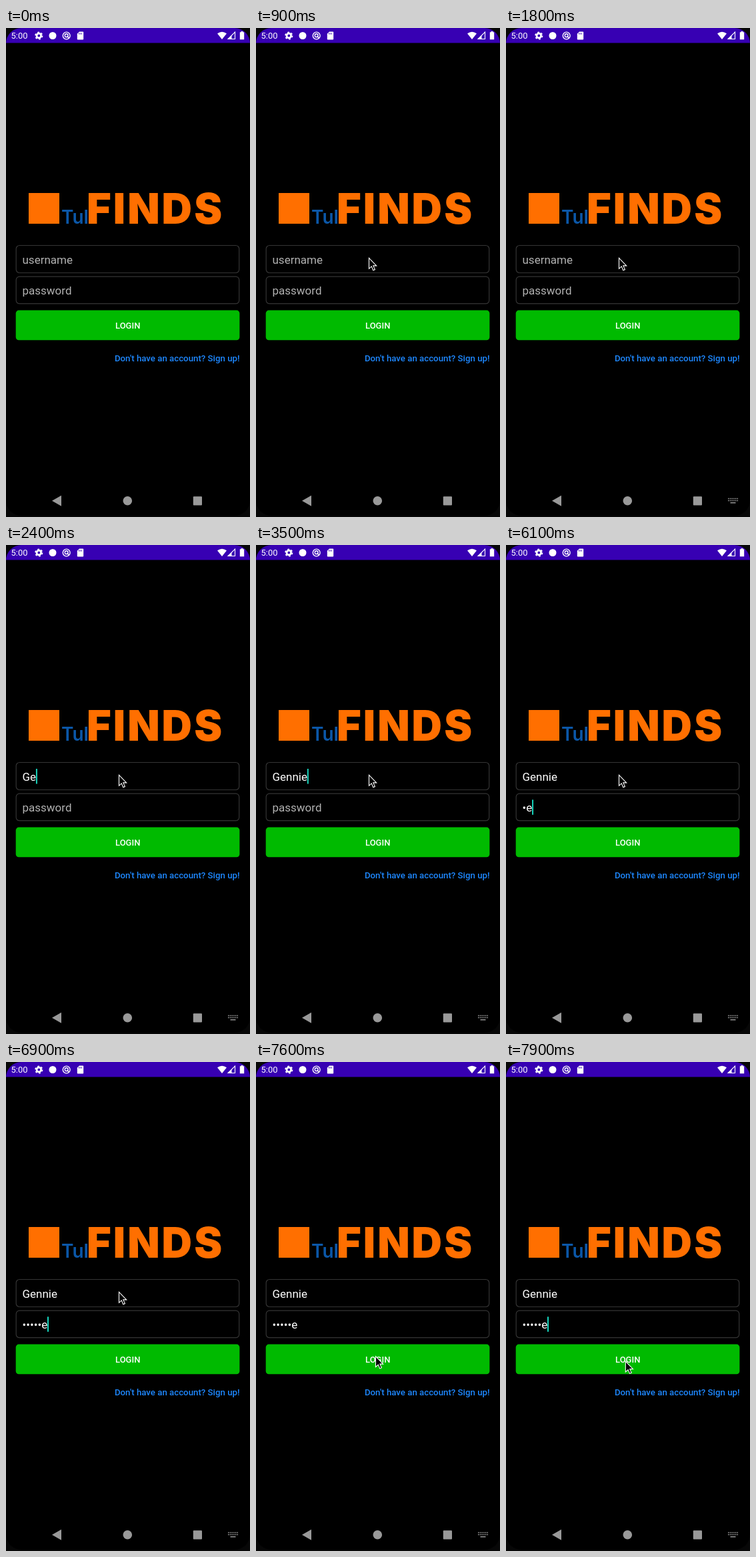
An HTML page for the animation above (8 s loop, 366 by 732 pixels).

```html
<!DOCTYPE html>
<html lang="en">
<head>
<meta charset="utf-8">
<title>Login screen</title>
<style>
  html, body { margin: 0; width: 100%; height: 100%; overflow: hidden; background: #070707; }
  svg { display: block; width: 366px; height: 732px; }
  text { font-family: Roboto, "Open Sans", sans-serif; white-space: pre; }
  .entry { font-size: 17px; fill: #fff; }
  .entry.hint { fill: #b2b2b2; }
  .field { fill: none; stroke: #343434; stroke-width: 1.2; }
  .brand { font-family: Inter, "Liberation Sans", sans-serif; }
</style>
</head>
<body>
<svg viewBox="0 0 366 732">
  <defs><clipPath id="screen"><rect width="366" height="730" rx="23"/></clipPath></defs>
  <g clip-path="url(#screen)">
    <rect width="366" height="732"/>
    <rect width="366" height="22.4" fill="#3700b3"/>
  </g>

  <!-- status bar -->
  <g fill="#fff">
    <text x="7.5" y="16.3" font-size="13">5:00</text>
    <g fill="none" stroke="#fff">
      <circle cx="49.3" cy="11.5" r="3.3" stroke-width="2.8"/>
      <circle cx="49.3" cy="11.5" r="5.2" stroke-width="1.8" stroke-dasharray="2.7 2.745"/>
      <circle cx="90.7" cy="11.5" r="5.4" stroke-width="1.4"/>
      <circle cx="90.7" cy="11.2" r="2.4" stroke-width="1.4"/>
      <path d="M91.5 12l3 3" stroke-width="1.4"/>
    </g>
    <circle cx="70" cy="11.5" r="5.5"/>
    <path d="M110 5.5h5.2q1 0 1 1v10q0 1-1 1h-7.4q-1 0-1-1v-7.8z"/>
    <path d="M109.5 7.5v2m2-2v2m2-2v2" stroke="#3700b3"/>
    <path d="M317 8.2q7-5 14 0l-7 8.8z"/>
    <path d="M343.5 6v10.5h-10.5z" fill="none" stroke="#fff" stroke-width="1.1"/>
    <path d="M338.5 11v5.5h-5.5z"/>
    <path d="M352.5 5h3v1.3h1.7v11h-6.4v-11h1.7z"/>
  </g>

  <!-- brand -->
  <rect x="34" y="247" width="46" height="46" fill="#ff6f00"/>
  <text class="brand" x="83" y="293" font-size="28" font-weight="600" fill="#0b57a8">Tul</text>
  <text class="brand" x="121" y="293" font-size="63" font-weight="900" letter-spacing="3" fill="#ff6f00">FINDS</text>

  <!-- form -->
  <rect class="field" x="15.2" y="325.5" width="334.5" height="41" rx="5"/>
  <rect class="field" x="15.2" y="372.2" width="334.5" height="40.5" rx="5"/>
  <text class="entry" id="user" x="24.5" y="353"></text>
  <text class="entry" id="pass" x="24.5" y="399"></text>
  <rect id="caret" width="2" height="22.5" fill="#16d5bd"/>
  <rect x="14.7" y="422.6" width="335.7" height="44.7" rx="4.5" fill="#00ba00"/>
  <text x="182.7" y="450" font-size="13" font-weight="500" fill="#fff" text-anchor="middle">LOGIN</text>
  <text x="350.5" y="499.3" font-size="13.25" font-weight="500" fill="#1e88ff" text-anchor="end">Don't have an account? Sign up!</text>

  <!-- navigation -->
  <g fill="#999">
    <path d="M69 707.7l14-8v16z"/>
    <circle cx="182.3" cy="707.7" r="6.8"/>
    <rect x="280.8" y="701.2" width="13.2" height="13.2" rx="1"/>
  </g>
  <g id="keys" stroke="#999" stroke-width="1.5" fill="none">
    <path d="M333 704.5h15m-15 3h15" stroke-dasharray="1.6 1.1"/>
    <path d="M336.5 710.7h8"/>
  </g>

  <path id="mouse" d="M0 0V16L3.8 12.6L6.3 18.4L8.9 17.3L6.4 11.6H11.2Z" fill="#000" stroke="#fff" stroke-width="1.1"/>
</svg>
<script>
  const $ = id => document.getElementById(id);
  const LOOP = 8000, STEP = 100, WORD = "Gennie";
  const userKeys = [2000, 2400, 2800, 3000, 3300, 3500];
  const passKeys = [5500, 6100, 6300, 6500, 6700, 6900];
  const TAB = 4100;

  // Caret visible from the first to the second time of each pair
  const caretOn = [[1000, 1400], [1900, 4000], [4100, 4600], [5100, 6000], [6100, 7400], [7900, 8000]];

  // time, x, y
  const path = [
    [300, 349, 4], [400, 305, 110], [500, 225, 250], [600, 147, 355], [700, 160, 350],
    [800, 160, 350], [900, 169.5, 344.3], [6900, 169.5, 344.3], [7300, 175, 400],
    [7700, 181, 454], [7900, 179.3, 448], [8000, 179.3, 448]
  ];

  const typed = (keys, t) => keys.filter(k => k <= t).length;
  const mask = n => n ? "•".repeat(n - 1) + WORD[n - 1] : "";

  function setEntry(el, value, hint) {
    el.textContent = value || hint;
    el.classList.toggle("hint", !value);
    return value ? el.getComputedTextLength() : 0;
  }

  function mouseAt(t) {
    const i = Math.max(1, path.findIndex(p => p[0] > t));
    const [a, b] = [path[i - 1], path[i]];
    const k = (t - a[0]) / (b[0] - a[0]);
    return [1, 2].map(n => a[n] + (b[n] - a[n]) * k);
  }

  const show = (el, on) => el.setAttribute("visibility", on ? "visible" : "hidden");

  function draw(t) {
    const userW = setEntry($("user"), WORD.slice(0, typed(userKeys, t)), "username");
    const passW = setEntry($("pass"), mask(typed(passKeys, t)), "password");
    const inPass = t >= TAB;
    $("caret").setAttribute("x", 24.3 + (inPass ? passW : userW));
    $("caret").setAttribute("y", inPass ? 381.3 : 335);
    show($("caret"), caretOn.some(([a, b]) => t >= a && t < b));
    show($("keys"), t >= 1100);
    show($("mouse"), t >= 300);
    if (t >= 300) $("mouse").setAttribute("transform", `translate(${mouseAt(t)})`);
  }

  const start = performance.now();
  let last = -1;
  function tick(now) {
    const t = Math.floor(Math.max(0, now - start) % LOOP / STEP) * STEP;
    if (t !== last) draw(last = t);
    requestAnimationFrame(tick);
  }
  draw(0);
  requestAnimationFrame(tick);
</script>
</body>
</html>
```
